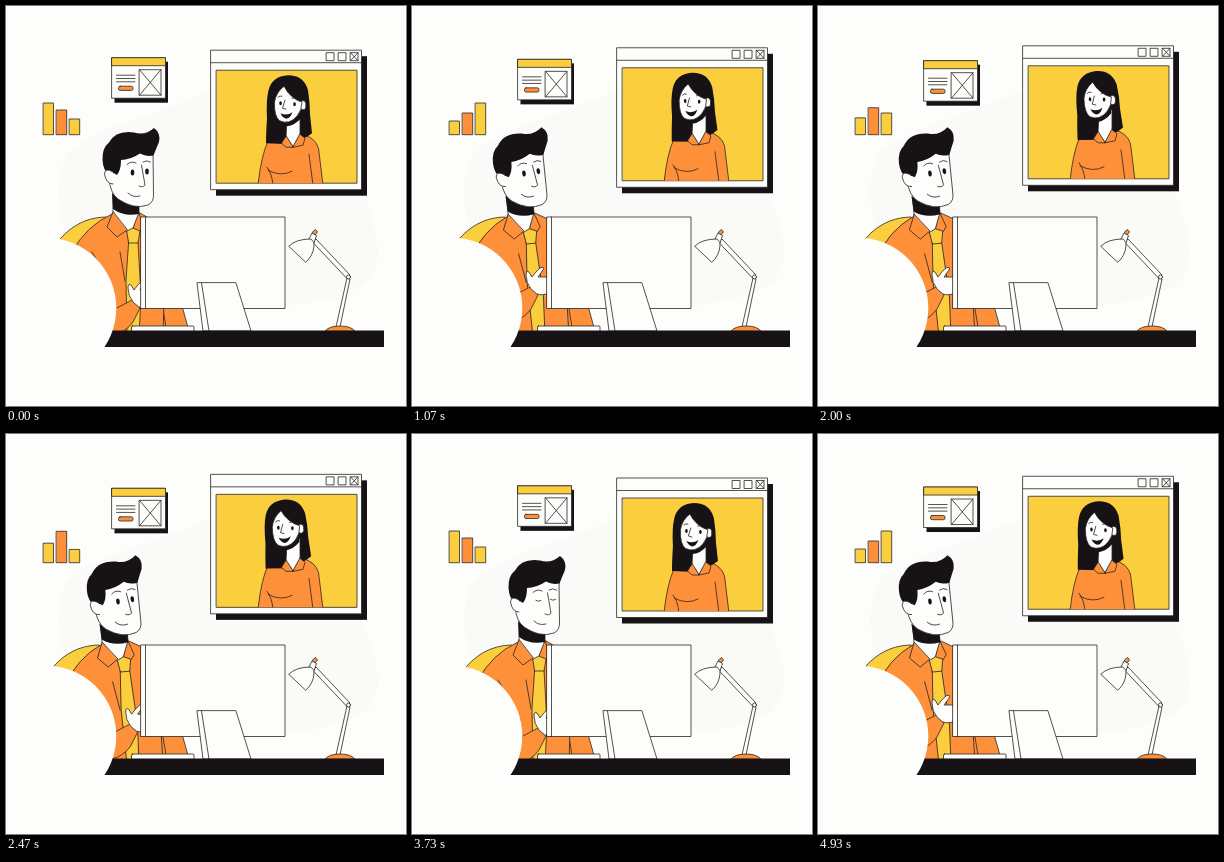
Animation, 400 px wide and 400 px high, one loop 4.99 s. Source, as an HTML page:

```html
<!DOCTYPE html>
<html lang="en">
<head>
<meta charset="utf-8">
<title>Video call</title>
<style>
  html, body { margin: 0; width: 100%; height: 100%; overflow: hidden; background: #fdfdfb; }
  svg { display: block; width: 100%; height: 100%; stroke: #2a2626; stroke-width: .8; stroke-linejoin: round; stroke-linecap: round; fill: none; }
  .paper { fill: #fdfdfb; }
  .yellow { fill: #fbce3e; }
  .orange { fill: #ff903a; }
  .ink { fill: #161216; stroke: none; }
  .flat { stroke: none; }
</style>
</head>
<body>
<svg viewBox="0 0 400 400">
  <defs>
    <clipPath id="view"><rect x="210.5" y="64" width="140.5" height="113"/></clipPath>
  </defs>

  <path class="flat" fill="#fafaf8" d="M60 150C85 120 150 110 195 88C260 60 350 130 370 230C380 280 350 290 280 300H110C60 260 40 190 60 150Z"/>

  <g id="bars">
    <rect class="yellow" x="37.5" width="10"/>
    <rect class="orange" x="50.5" width="10.2"/>
    <rect class="yellow" x="63.5" width="10.2"/>
  </g>

  <g id="card">
    <rect class="ink" x="108.5" y="55.5" width="53.5" height="41"/>
    <rect class="paper" x="106" y="51.5" width="53.500" height="40.5"/>
    <rect class="yellow" x="106" y="51.5" width="53.500" height="8"/>
    <path d="M110.5 69H129M110.5 72.3H129M110.5 75.6H129"/>
    <rect class="orange" x="112.5" y="80" width="14.5" height="4.2" rx="1.6"/>
    <path d="M133.5 63.5H155V89H133.5ZL155 89M155 63.5L133.5 89"/>
  </g>

  <g id="call">
    <rect class="ink" x="210" y="50" width="151" height="139.500"/>
    <rect class="paper" x="205" y="44" width="150.5" height="139.500"/>
    <path d="M205 56.5H355.5M320.5 46.5h7.5v8h-7.5zM332.5 46.5h7.5v8h-7.5zM344.5 46.5h7.5v8h-7.5zl7.5 8m0-8l-7.5 8"/>
    <rect class="yellow" x="210.5" y="64" width="140.5" height="113"/>
    <g clip-path="url(#view)">
      <path class="orange" d="M252 179Q255 150 262 135L280 130L296 128Q309 131 312.500 142L317 179Z"/>
      <path d="M261 161Q266 167 267 179M262 164Q275 171 286 165M303 148L307 179"/>
      <path class="ink" id="hair" d="M260 137Q260 128 261 112Q260 94 262.500 84Q266 70 282 69Q298 69 302 84Q304 96 304 108L306 127Q300 132 284 138Z"/>
      <path class="paper" d="M281 112L280 131L287 141L294 129V108Z"/>
      <path class="orange" d="M280 130L275.500 137L280 141L287 141ZM294 128L299 132L297 139L287 141Z"/>
      <g id="face">
        <path class="ink" d="M274 112L281 120Q289 119 295 112V104Z"/>
        <ellipse class="paper" cx="297" cy="99" rx="3" ry="4.500"/>
        <path class="paper" d="M278 80Q270 86 268.500 96Q268 110 273.500 114.500Q283 119 291 110Q296 104 296 96Q284 92 278 80Z"/>
        <path d="M272 91q2-2 4-1M286 92q3-1 5 1M279 94L276.500 102L280 103"/>
        <path class="ink" d="M274.500 95a1.300 2 0 1 0 .1 0ZM288.500 96a1.300 2 0 1 0 .1 0Z"/>
        <path class="ink" d="M274.500 107Q281 110 286.500 106Q284 112.500 280 112.500Q276 111 274.500 107Z"/>
      </g>
    </g>
  </g>

  <path id="chair" class="yellow" d="M50 238C62 222 78 211.500 100 211L114 222L84 250Z"/>

  <path class="orange" d="M118 300H176L183 325H118Z"/>
  <path d="M157 303L160 321"/>

  <g id="man">
    <path class="orange" d="M66 246Q80 220 106 208L134 207L160 222L157 330H84Z"/>
    <path d="M86 246Q98 266 108 286M114 246L119 275"/>
    <path class="paper" d="M107 190L107 207L121 226L127 223L133 209V195Z"/>
    <path class="orange" d="M107 206L101 221L111 231L121 224ZM133 207L138 221L134 226L127 223Z"/>
    <path class="yellow" d="M123 236H132L135 290L133 330H121L120 275Z"/>
    <path class="yellow" d="M121 225L127 222L134 225L132 237H123Z"/>
    <path class="ink" d="M106 187Q118 199 133 199V208Q118 211 107 203Z"/>
    <path class="paper" d="M104 148L103 172Q104 187 112 193Q128 204 142 199Q148 196 147.500 188L147 145Z"/>
    <path class="ink" d="M103 169Q97 164 96.500 154Q96 142 103 136.500Q110 124 128 126.500Q139 130 148 122Q155 127 153 136Q150 143 147.500 149.500Q140 151 134 147.500Q124 154 115 154Q115 164 111 169Q106 165 103 169Z"/>
    <path class="paper" d="M107 166Q99 161 98.500 168Q100 178 107 178"/>
    <path d="M121 158.500Q125 154.500 130 157M137 156Q141 153.500 144.500 156M135.500 159L139 179Q137 182 133 180M122 187Q127 192 134 190"/>
    <g id="eyes">
      <ellipse class="ink" cx="126.500" cy="166.500" rx="1.800" ry="3"/>
      <ellipse class="ink" cx="141" cy="165.500" rx="1.800" ry="3"/>
    </g>
    <path id="lids" d="M124 166.500q2.500 1.500 5 0M138.500 165.500q2.500 1.500 5 0"/>
  </g>

  <g id="arm">
    <path class="orange" d="M103 289L118 281Q123 284 126 289L119 303Q112 313 100 316"/>
    <path class="paper" d="M119 283Q114 277 114 269Q114 264 117 266L120 271Q124 265 128 262Q133 260 131 264L126 271H138V287Q130 290 125 288Z"/>
  </g>

  <rect class="paper" x="125.500" y="320" width="62.500" height="6" rx="1"/>
  <rect class="paper" x="135" y="211" width="144" height="91.500"/>
  <path d="M139.500 211V302.500"/>
  <path class="paper" d="M191 277L197 325H245L230 277Z"/>
  <path d="M195.500 277L203 325"/>

  <path class="paper" d="M330 321L341 272L344 273L334 321Z"/>
  <path class="paper" d="M307 236L310 233L344 269L341 272Z"/>
  <circle class="paper" cx="342.500" cy="271" r="2"/>
  <path class="orange" d="M306.500 226L309.500 223.500L311.500 226L309 229Z"/>
  <path class="paper" d="M303 233L306 227L310.500 229.500L308 237Z"/>
  <path class="paper" d="M283 240Q290 233 305 233Q309 236 308 240Q307 250 300 256Z"/>
  <path class="orange" d="M319 325Q323 320 334 320Q345 320 349 325Z"/>

  <rect class="ink" x="90" y="324.500" width="288" height="16.500"/>
  <circle class="paper flat" cx="40" cy="302" r="70.300"/>
</svg>

<script>
const LOOP = 4990, FRAMES = 75, CYCLE = 4000;
const $ = id => document.getElementById(id);
const barRects = [...$('bars').children];
const FLOOR = 128.7;

// Each row: time in ms, then values eased towards the next row.
const BARS = [
  [0, 97, 104, 113], [900, 115, 107, 97], [1350, 115, 107, 97],
  [2600, 109, 97, 116], [2900, 108.5, 97, 116], [3750, 97, 104, 113], [4000, 97, 104, 113]
];
const LEAN = [[0, 0], [70, 0], [530, 1], [2670, 1], [3100, 0], [4000, 0]];
const HAND = [[0, 8, 13], [150, 8, 13], [850, 0, 0], [2050, 0, 0], [2700, 8, 13], [4000, 8, 13]];

function track(rows, t) {
  const i = rows.findIndex(row => row[0] > t);
  const a = rows[i - 1], b = rows[i];
  const k = (1 - Math.cos(Math.PI * (t - a[0]) / (b[0] - a[0]))) / 2;
  return a.slice(1).map((v, n) => v + (b[n + 1] - v) * k);
}

function move(id, transform) {
  $(id).setAttribute('transform', transform);
}

function draw(time) {
  const frame = Math.floor(time % LOOP / LOOP * FRAMES);
  const t = frame * LOOP / FRAMES % CYCLE;
  const sway = 1 - Math.cos(2 * Math.PI * t / CYCLE);

  move('call', `translate(0 ${.2 - 2.2 * sway})`);
  move('card', `translate(0 ${.2 + 1.5 * sway})`);
  const tilt = `translate(${-.4 * sway} 0) rotate(${-1.5 * sway} 283 130)`;
  move('hair', tilt);
  move('face', tilt);

  track(BARS, t).forEach((top, i) => {
    barRects[i].setAttribute('y', top);
    barRects[i].setAttribute('height', FLOOR - top);
  });

  const [lean] = track(LEAN, t);
  move('man', `rotate(${-5.1 * lean} 130 330)`);
  move('chair', `translate(${-7 * lean} 0)`);
  move('arm', `translate(${track(HAND, t).join(' ')})`);

  const blink = t > 3650 && t < 3810;
  $('eyes').style.display = blink ? 'none' : '';
  $('lids').style.display = blink ? '' : 'none';
}

let start;
function tick(now) {
  start ??= now;
  draw(now - start);
  requestAnimationFrame(tick);
}
draw(0);
requestAnimationFrame(tick);
</script>
</body>
</html>
```
